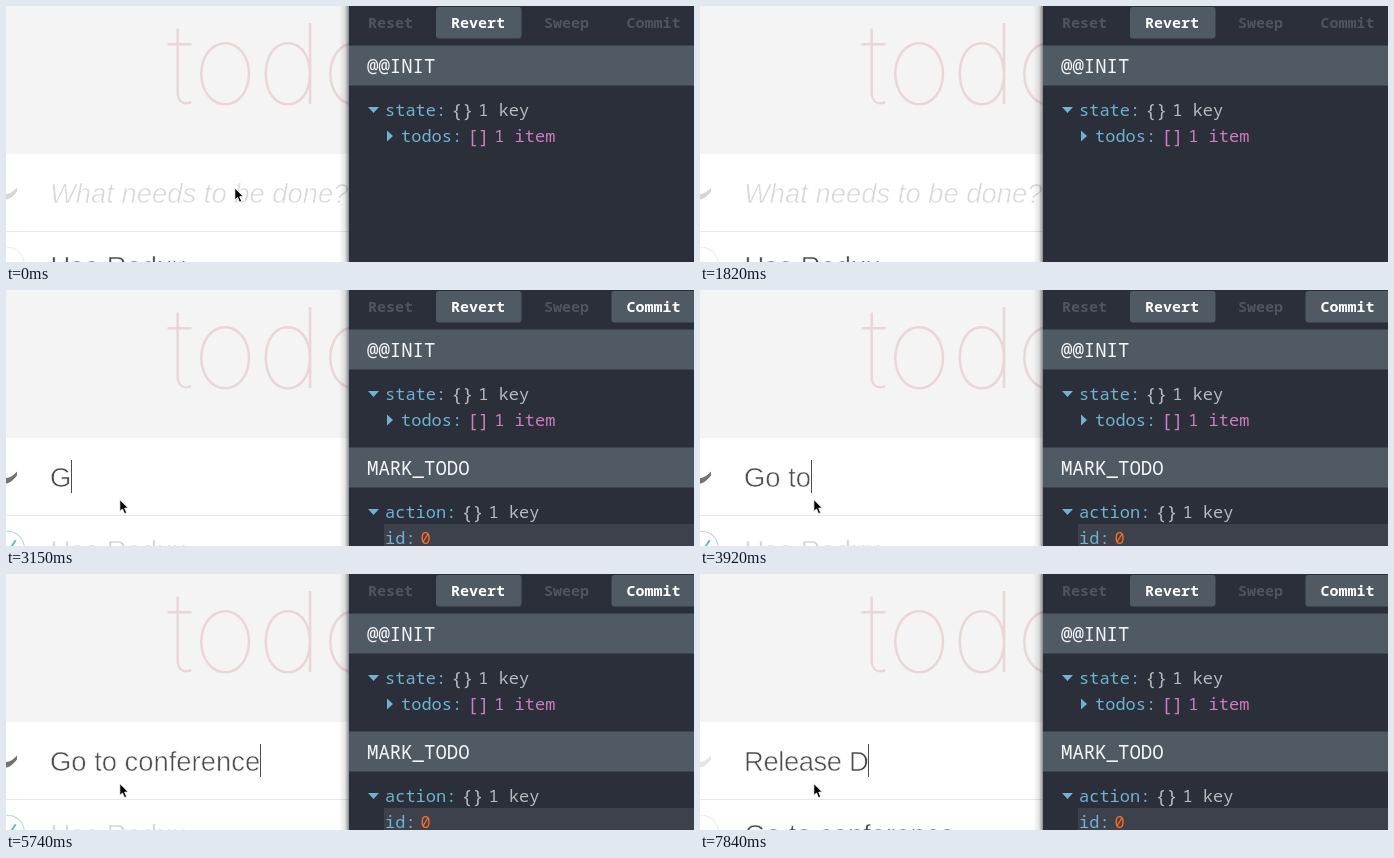
Write an HTML page with a canvas that moves like this. It is 688 px wide and 256 px high and loops after 8 s.

```html
<!DOCTYPE html>
<html lang="en">
<head>
<meta charset="utf-8">
<title>Todo list with action log</title>
<style>
  html, body { margin: 0; width: 100%; height: 100%; overflow: hidden; background: #fff; }
  canvas { display: block; }
</style>
</head>
<body>
<canvas id="stage" width="688" height="256"></canvas>
<script>
const ctx = document.getElementById('stage').getContext('2d');
const LOOP = 8000;
const SANS = '"Liberation Sans", Arial, sans-serif';
const MONO = '"Noto Sans Mono", "DejaVu Sans Mono", monospace';
const BLUE = '#6fb3d2', PINK = '#d07cc0', GREY = '#b8babd', SLATE = '#4f5a65';
const CHECKED = 2100, FADED = 2380, SUBMITTED = 6020;

// Each track is a list of [start time, value]; values hold until the next start.
const typing = [
  [0, ''], [3150, 'G'], [3640, 'Go '], [3920, 'Go to'], [4480, 'Go to '],
  [4690, 'Go to co'], [4970, 'Go to conf'], [5250, 'Go to confere'],
  [5530, 'Go to conferen'], [5740, 'Go to conference'], [SUBMITTED, ''],
  [6580, 'Re'], [6790, 'Rel'], [7070, 'Relea'], [7350, 'Releas'],
  [7630, 'Release '], [7840, 'Release D']
];
const caret = [[0, false], [280, true], [770, false], [1330, true], [1820, false], [2590, true]];
const pointer = [
  [0, [228, 181]], [280, [211, 184]], [1330, [144, 213]], [1540, null],
  [CHECKED, [81, 224]], [FADED, [113, 208.5]]
];
const chevronColor = [[0, '#d6d6d6'], [CHECKED, '#737373'], [SUBMITTED, '#e4e4e4']];

function at(track, time) {
  let value = track[0][1];
  for (const [start, v] of track) if (time >= start) value = v;
  return value;
}

function rect(x, y, w, h, color) {
  ctx.fillStyle = color;
  ctx.fillRect(x, y, w, h);
}

function shape(points, color) {
  ctx.beginPath();
  points.forEach(([x, y]) => ctx.lineTo(x, y));
  ctx.closePath();
  ctx.fillStyle = color;
  ctx.fill();
}

function text(str, x, y, font, color) {
  ctx.font = font;
  ctx.fillStyle = color;
  ctx.fillText(str, x, y);
}

// Trims the glyph edges with the white background for a light weight.
function lightText(str, x, y, color, style = '') {
  text(str, x, y, `${style} 27.4px ${SANS}`, color);
  ctx.strokeStyle = '#fff';
  ctx.lineWidth = 0.6;
  ctx.lineJoin = 'round';
  ctx.strokeText(str, x, y);
}

function drawChevron(color) {
  ctx.beginPath();
  ctx.moveTo(11, 181.5);
  ctx.quadraticCurveTo(6, 187, 1, 188);
  ctx.quadraticCurveTo(-4, 187, -9, 181.5);
  ctx.lineTo(-9, 185.5);
  ctx.quadraticCurveTo(-4, 192, 1, 193.5);
  ctx.quadraticCurveTo(6, 192, 11, 185.5);
  ctx.fillStyle = color;
  ctx.fill();
}

function drawToggle(done) {
  const cx = 1.5, cy = 258;
  ctx.beginPath();
  ctx.arc(cx, cy, 16.8, 0, Math.PI * 2);
  ctx.strokeStyle = done ? '#bddad5' : '#ebebeb';
  ctx.lineWidth = 1.1;
  ctx.stroke();
  if (!done) return;
  const tick = [[22, -25], [-8, 21], [-23, 6], [-27, 10], [-7, 30], [27, -22]];
  shape(tick.map(([x, y]) => [cx + x * 0.335, cy + y * 0.335]), '#5dc2af');
}

function drawInput(time) {
  const typed = at(typing, time);
  ctx.letterSpacing = typed.startsWith('R') ? '-0.4px' : '0px';
  if (typed) lightText(typed, 44, 197, '#4d4d4d');
  else lightText('What needs to be done?', 44, 197, '#d8d8d8', 'italic');
  if (at(caret, time)) {
    const width = typed ? ctx.measureText(typed).width : 0;
    rect(Math.round(44 + width), 170, 1, 33, '#4d4d4d');
  }
  ctx.letterSpacing = '0px';
}

function drawItem(time) {
  const submitted = time >= SUBMITTED;
  const done = time >= CHECKED && !submitted;
  const color = !done ? '#4d4d4d' : time < FADED ? '#a0a0a0' : '#d4d4d4';
  drawToggle(done);
  lightText(submitted ? 'Go to conference' : 'Use Redux', 44.5, 269.5, color);
}

function drawList(time) {
  rect(0, 0, 343, 256, '#f4f4f4');
  text('todos', 161, 98, '100 111px Inter, Roboto, sans-serif', 'rgba(175,47,47,0.15)');
  rect(0, 148, 343, 108, '#fff');
  rect(0, 225, 343, 1, '#e6e6e6');
  drawChevron(at(chevronColor, time));
  drawInput(time);
  drawItem(time);
}

function drawButton(label, x, width, active) {
  if (active) {
    ctx.beginPath();
    ctx.roundRect(x, 1, width, 31.5, 3);
    ctx.fillStyle = SLATE;
    ctx.fill();
  }
  text(label, x + 15, 22, `bold 15px ${MONO}`, active ? '#fff' : '#4f555f');
}

function drawHeading(label, y) {
  rect(343, y, 345, 40, SLATE);
  text(label, 361, y + 27.5, `19px ${MONO}`, '#f4f5f6');
}

function drawNode(label, x, y, brackets, summary, color, open) {
  const font = `17px ${MONO}`;
  const arrow = open
    ? [[x - 17, y - 9], [x - 6, y - 9], [x - 11.5, y - 3]]
    : [[x - 14, y - 11.5], [x - 8, y - 6], [x - 14, y - 0.5]];
  shape(arrow, BLUE);
  text(label, x, y, font, BLUE);
  const end = x + ctx.measureText(label).width;
  text(brackets, end + 5, y + 0.5, `18.5px ${MONO}`, color);
  text(summary, end + 32, y, font, color);
}

function drawPanel(time) {
  const shadow = ctx.createLinearGradient(333, 0, 343, 0);
  shadow.addColorStop(0, 'rgba(0,0,0,0)');
  shadow.addColorStop(0.6, 'rgba(0,0,0,0.1)');
  shadow.addColorStop(1, 'rgba(0,0,0,0.45)');
  rect(333, 0, 10, 256, shadow);
  rect(343, 0, 345, 256, '#2a2f3a');

  const marked = time >= CHECKED;
  drawButton('Reset', 347, 75, false);
  drawButton('Revert', 430, 85.5, true);
  drawButton('Sweep', 523, 75, false);
  drawButton('Commit', 605.5, 85.5, marked);

  drawHeading('@@INIT', 39.5);
  drawNode('state:', 379, 110, '{}', '1 key', GREY, true);
  drawNode('todos:', 395, 136, '[]', '1 item', PINK, false);
  if (!marked) return;
  drawHeading('MARK_TODO', 157.5);
  drawNode('action:', 379, 228, '{}', '1 key', GREY, true);
  rect(378, 234, 310, 22, '#3d414c');
  text('id:', 379, 254, `17px ${MONO}`, BLUE);
  text('0', 414.5, 254, `17px ${MONO}`, '#fc6d24');
}

function drawPointer(position) {
  if (!position) return;
  const [x, y] = position;
  const arrow = [[0.8, 1], [0.8, 13], [3.5, 10.5], [5.5, 15.2], [7.7, 14.2], [5.7, 9.7], [9.3, 9.5]];
  shape(arrow.map(([dx, dy]) => [x + dx, y + dy]), '#000');
  ctx.strokeStyle = '#fff';
  ctx.lineWidth = 0.9;
  ctx.lineJoin = 'miter';
  ctx.stroke();
}

function draw(now) {
  const time = now % LOOP;
  drawList(time);
  drawPanel(time);
  drawPointer(at(pointer, time));
  requestAnimationFrame(draw);
}
requestAnimationFrame(draw);
</script>
</body>
</html>
```
